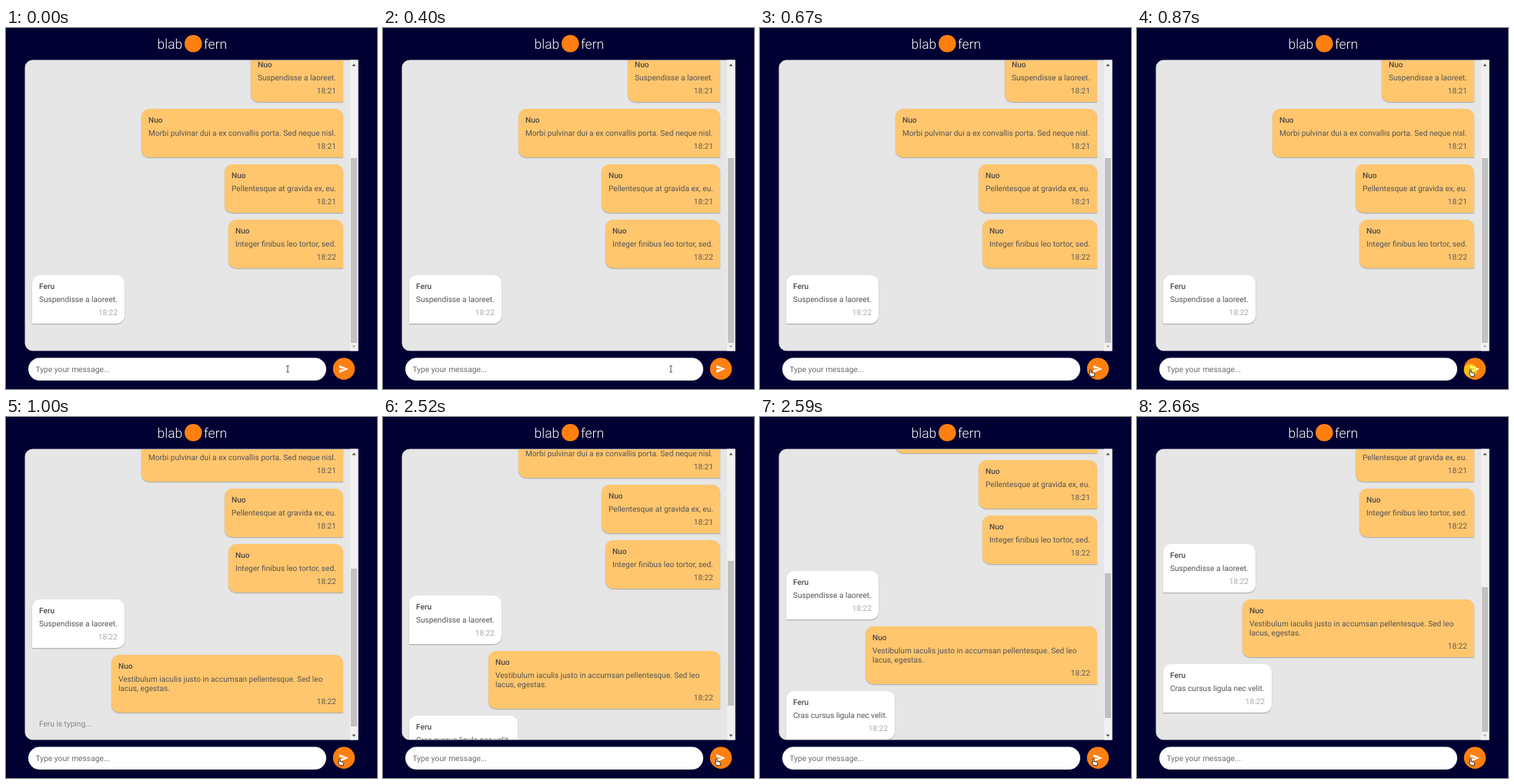
An HTML page for the animation above (3120 ms loop, 482 by 469 pixels).

```html
<!DOCTYPE html>
<html lang="en">
<head>
<meta charset="utf-8">
<title>Chat</title>
<style>
  html, body { margin: 0; width: 100%; height: 100%; overflow: hidden; background: #000032; }
  body { position: relative; font: 10.15px/12px Roboto, sans-serif; text-rendering: geometricPrecision; }
  .step { animation: 3120ms step-end infinite; }

  .stage { position: absolute; left: 0; top: 0; }
  .panel { position: absolute; left: 25px; top: 42px; width: 432px; height: 377px; overflow: hidden; }
  .list { position: absolute; inset: 0; animation-name: scroll; }
  .msg {
    position: absolute; left: 9px; top: var(--y); width: var(--w);
    box-sizing: border-box; padding: 10px 9px 7px; white-space: nowrap;
    border-radius: 10px 10px 10px 0; background: #fff; color: #555;
    box-shadow: 0 1px 1.5px rgba(0, 0, 0, .28);
  }
  .own { left: auto; right: 19px; border-radius: 10px 10px 0 10px; background: #ffc66d; }
  .msg b { display: block; font-weight: 500; color: #504a45; }
  .msg p { margin: 5px 0; }
  .msg time { display: block; text-align: right; color: #aaa; }
  .own time { color: #665d52; }
  .typing { position: absolute; left: 18px; top: 436px; color: #858585; animation-name: typing; }
  .sent { animation-name: sent; }
  .reply { animation-name: reply; }

  .thumb { position: absolute; right: 1px; width: 8px; background: #c1c1c1; animation-name: thumb; }
  .down { animation-name: down; }
  .ibeam { animation-name: ibeam; }
  .hand { animation-name: hand; }
  .click { animation-name: click; }

  @keyframes scroll {
    0% { transform: none; }
    32.05% { transform: translateY(-84px); }
    80.76% { transform: translateY(-89px); }
    83.01% { transform: translateY(-121px); }
    85.25%, 100% { transform: translateY(-156px); }
  }
  @keyframes thumb {
    0% { top: 127px; height: 240px; }
    32.05% { top: 155px; height: 205px; }
    80.76% { top: 145px; height: 188px; }
    83.01% { top: 161px; height: 188px; }
    85.25%, 100% { top: 179px; height: 188px; }
  }
  @keyframes down {
    0% { fill: #b0b0b0; }
    32.05% { fill: #505050; }
    85.25%, 100% { fill: #b0b0b0; }
  }
  @keyframes sent { 0% { opacity: 0; } 32.05%, 100% { opacity: 1; } }
  @keyframes reply { 0% { opacity: 0; } 80.76%, 100% { opacity: 1; } }
  @keyframes typing { 0% { opacity: 0; } 32.05% { opacity: 1; } 80.76%, 100% { opacity: 0; } }
  @keyframes click { 0% { opacity: 0; } 27.88% { opacity: 1; } 32.05%, 100% { opacity: 0; } }
  @keyframes ibeam {
    0% { transform: translate(366px, 443px); opacity: 1; }
    12.82% { transform: translate(374px, 443px); opacity: 1; }
    15.06% { transform: translate(388px, 443px); opacity: 1; }
    17.3% { transform: translate(403px, 443px); opacity: 1; }
    19.55% { transform: translate(413px, 444px); opacity: 1; }
    21.47%, 100% { transform: translate(413px, 444px); opacity: 0; }
  }
  @keyframes hand {
    0% { transform: translate(427px, 443px); opacity: 0; }
    21.47% { transform: translate(427px, 443px); opacity: 1; }
    23.71%, 100% { transform: translate(430.8px, 443px); opacity: 1; }
  }
</style>
</head>
<body>
<svg class="stage" width="482" height="469">
  <g fill="#fff" font-size="17.5" font-weight="300">
    <text x="196.5" y="26.5">blab</text>
    <text x="257" y="26.5">fern</text>
  </g>
  <circle cx="243.3" cy="20.3" r="11.3" fill="#ff7f11"/>

  <path d="M457.5 41.5v378h-423a10 10 0 0 1-10-10v-358a10 10 0 0 1 10-10z" fill="#e6e6e6"/>
  <path d="M447 41.5h10.5v378H447z" fill="#f1f1f1"/>
  <path d="M449.5 49.5 452 46.5l2.5 3z" fill="#505050"/>
  <path class="down step" d="M449.5 412.5 452 415.5l2.5-3z"/>

  <rect x="29" y="428.5" width="387" height="29.5" rx="14.75" fill="#fff"/>
  <text x="38.5" y="446.6" font-size="10.25" fill="#6c6c6c">Type your message...</text>

  <circle cx="439" cy="442.8" r="14.2" fill="#ff7f11"/>
  <path transform="translate(432 436.2) scale(.56)" d="M2 21 23 12 2 3v7l15 2-15 2z" fill="#fff"/>

  <circle class="click step" cx="433.2" cy="444.8" r="8.8" fill="#ff0" fill-opacity=".5"/>
  <path class="ibeam step" d="M-1.8-4H1.8M0-4V4M-1.8 4H1.8" fill="none" stroke="#444" stroke-width=".9"/>
  <path class="hand step" d="M2.5 1c.9 0 1 .6 1 1v2.6l3.2.7c.9.2 1.2.8 1.1 1.5L7.2 9.8H3L.6 6.6c-.3-.6.3-1.2 1-.7V2c0-.4.1-1 .9-1z"
    fill="#fff" stroke="#111" stroke-width=".9"/>
</svg>

<main class="panel">
  <div class="list step"></div>
  <div class="thumb step"></div>
</main>

<script>
  const OWN = 'Nuo', OTHER = 'Feru';
  // author, width, text, time, extra class
  const messages = [
    [OWN, 120, 'Suspendisse a laoreet.', '18:21'],
    [OWN, 262, 'Morbi pulvinar dui a ex convallis porta. Sed neque nisl.', '18:21'],
    [OWN, 154, 'Pellentesque at gravida ex, eu.', '18:21'],
    [OWN, 149, 'Integer finibus leo tortor, sed.', '18:22'],
    [OTHER, 120, 'Suspendisse a laoreet.', '18:22'],
    [OWN, 301, 'Vestibulum iaculis justo in accumsan pellentesque. Sed leo<br>lacus, egestas.', '18:22', 'sent step'],
    [OTHER, 141, 'Cras cursus ligula nec velit.', '18:22', 'reply step']
  ];

  let y = -9;
  const bubbles = messages.map(([author, width, text, time, extra = '']) => {
    const side = author === OWN ? 'own' : '';
    const html = `<div class="msg ${side} ${extra}" style="--y:${y}px;--w:${width}px">
      <b>${author}</b><p>${text}</p><time>${time}</time></div>`;
    y += text.includes('<br>') ? 84 : 72;
    return html;
  });
  document.querySelector('.list').innerHTML =
    bubbles.join('') + `<div class="typing step">${OTHER} is typing...</div>`;
</script>
</body>
</html>
```
